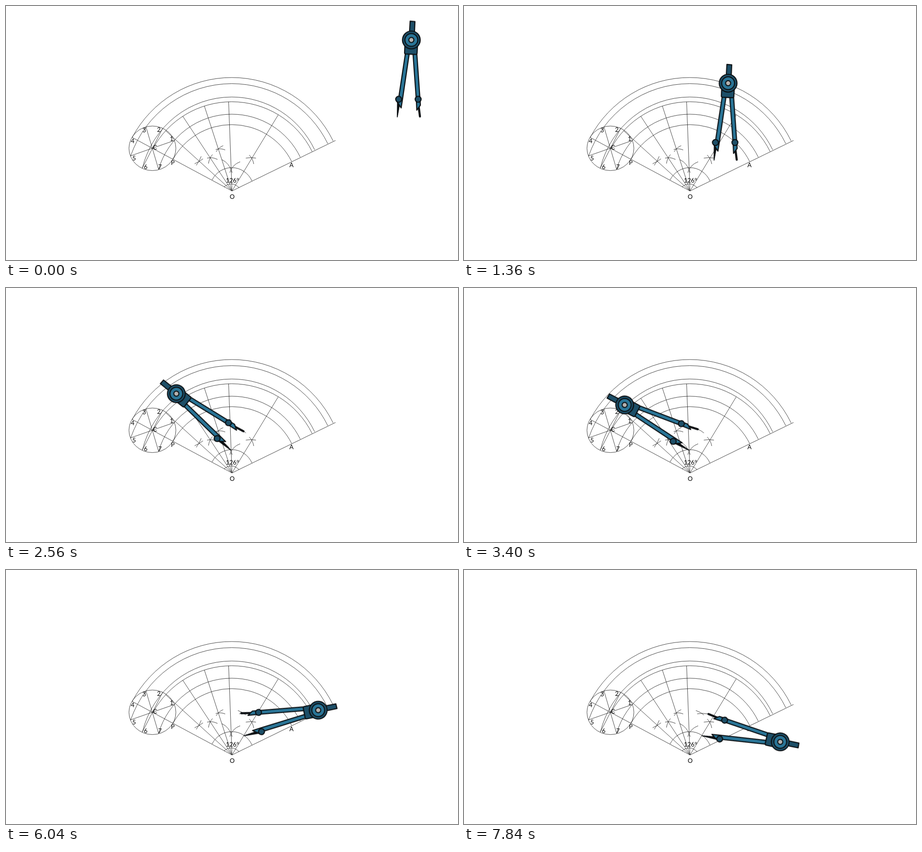
Animation of 998 by 561 pixels, one loop 7880 ms. Source, as an HTML page:

```html
<!DOCTYPE html>
<html lang="en">
<head>
<meta charset="utf-8">
<title>Bisecting the sector angle</title>
<style>
  html, body { margin: 0; width: 100%; height: 100%; overflow: hidden; background: #fff; }
  svg { display: block; width: 100vw; height: 100vh; }

  .lines { fill: none; stroke: #1c1c1c; stroke-width: .85; }
  .labels { font: 13.5px Lato, "Open Sans", sans-serif; fill: #000; text-anchor: middle; }

  .compass { stroke: #0b0f12; stroke-width: 2.3; stroke-linejoin: round; }
  .dark { fill: #1d4f68; }
  .blue { fill: #2a7597; }
  .metal { fill: #b4b2b0; }
  .ink { fill: #0b0f12; stroke-width: 1; }
  .lead { fill: none; stroke-width: 4.6; stroke-linecap: round; }

  .move, .spin, .trace { animation: 7.88s linear infinite; }
  .move { animation-name: move; }
  .spin { animation-name: spin; }
  .trace { stroke-dasharray: 1 2; }
  .first { animation-name: first; }
  .second { animation-name: second; }

  /* Position of the needle point */
  @keyframes move {
    0%, 1.2% { transform: translate(864px, 245.5px); animation-timing-function: cubic-bezier(.455, .03, .515, .955); }
    23.5% { transform: translate(496.5px, 358px); }
    51.52% { transform: translate(496.5px, 358px); animation-timing-function: cubic-bezier(.455, .03, .515, .955); }
    74.11%, 100% { transform: translate(525.5px, 366px); }
  }

  /* Turn about the needle point; mirrored for the second arc */
  @keyframes spin {
    0% { transform: rotate(0deg) scaleX(1); }
    23.6% { transform: rotate(0deg) scaleX(1); animation-timing-function: cubic-bezier(.455, .03, .515, .955); }
    31.73% { transform: rotate(-54.3deg) scaleX(1); }
    32.23% { transform: rotate(-54.3deg) scaleX(1); animation-timing-function: cubic-bezier(.455, .03, .515, .955); }
    51.52% { transform: rotate(-71.5deg) scaleX(1); }
    74.36% { transform: rotate(-71.5deg) scaleX(1); animation-timing-function: step-end; }
    74.37% { transform: rotate(79.7deg) scaleX(-1); }
    76.65% { transform: rotate(81.3deg) scaleX(-1); }
    81.22% { transform: rotate(85.3deg) scaleX(-1); }
    91.37% { transform: rotate(96.9deg) scaleX(-1); }
    99.49%, 100% { transform: rotate(104.8deg) scaleX(-1); }
  }

  @keyframes first {
    0% { stroke-dashoffset: 1.01; }
    29.73% { stroke-dashoffset: 1.01; animation-timing-function: ease-out; }
    31.73% { stroke-dashoffset: .72; }
    32.23% { stroke-dashoffset: .72; animation-timing-function: cubic-bezier(.455, .03, .515, .955); }
    51.52%, 100% { stroke-dashoffset: 0; }
  }

  @keyframes second {
    0%, 74.37% { stroke-dashoffset: 1.01; }
    76.65% { stroke-dashoffset: .89; }
    81.22% { stroke-dashoffset: .73; }
    91.37% { stroke-dashoffset: .3; }
    99.49%, 100% { stroke-dashoffset: 0; }
  }
</style>
</head>
<body>
<svg viewBox="0 0 998 561" preserveAspectRatio="none">
  <g class="lines">
    <!-- Generating circle and its spokes -->
    <ellipse cx="323.3" cy="314.3" rx="51.8" ry="49.2"/>
    <path d="M275 331 L372 297 M301 358 L346 270 M309 267 L337 361"/>

    <!-- Sector sides and bisectors -->
    <path d="M278 290 L499 408.5 L727.5 297"/>
    <path d="M499 408.5 L352 275 M499 408.5 L390 243 M499 408.5 L438 221 M499 408.5 L491.5 211.5 M499 408.5 L601 240.5"/>

    <!-- Arcs about O; dashes are in degrees clockwise from the right -->
    <g transform="translate(498.5 408)">
      <ellipse rx="249.2" ry="250" pathLength="360" stroke-dasharray="0 208 125.9 360"/>
      <ellipse rx="236" ry="236.5" pathLength="360" stroke-dasharray="0 199 134.9 360"/>
      <ellipse rx="203.4" ry="207" pathLength="360" stroke-dasharray="0 194.2 139.7 360"/>
      <ellipse rx="197.6" ry="196.5" pathLength="360" stroke-dasharray="0 208.2 125.7 360"/>
      <ellipse rx="168.3" ry="169" pathLength="360" stroke-dasharray="0 196.2 137.7 360"/>
      <ellipse rx="147.4" ry="146" pathLength="360" stroke-dasharray="0 207.9 126 360"/>
      <ellipse rx="49.2" ry="51" pathLength="360" stroke-dasharray="0 208 126.7 360"/>
    </g>
    <path d="M481 400 Q498 385 515 401.5"/>

    <!-- Bisection marks -->
    <path d="M416.5 348.5 Q426.5 344 435 337.5 M431 332 Q427 343 420 352"/>
    <path d="M444 336 Q456 333 467 339 M456 328 Q449 335 447 348"/>
    <path d="M463 317 Q474 313.5 484 318 M479.5 308.5 Q470 312 464 322"/>
    <path d="M477 339.5 Q493 347 499.5 368 M517 344 Q500 350 494 368"/>
    <path d="M529.5 336 Q541 333.5 552 336 M537 329 Q545 337 547 349"/>

    <path class="trace first" pathLength="1" d="M529.8 320.3 A50 50 0 0 0 512 310.3"/>
    <path class="trace second" pathLength="1" d="M514.9 317.8 A49.5 49.5 0 0 1 537.8 317.9"/>
  </g>

  <g class="labels">
    <text x="365.7" y="297.8">1</text>
    <text x="337.5" y="277.8">2</text>
    <text x="305.2" y="279">3</text>
    <text x="279.7" y="302.5">4</text>
    <text x="283" y="340.5">5</text>
    <text x="308.5" y="359.7">6</text>
    <text x="340" y="359.5">7</text>
    <text x="368.3" y="350.7">P</text>
    <text x="329" y="316.5">C</text>
    <text x="630.3" y="356">A</text>
    <text x="499.3" y="425.7">O</text>
    <text x="500" y="390">126°</text>
  </g>

  <g class="move"><g class="spin">
    <g class="compass" transform="translate(-864 -245.5)">
      <path class="ink" d="M864 212 L869 219 L864.3 245.5 L863.5 245.5 Z"/>
      <path class="lead" d="M911 221 L914 244"/>
      <path class="blue" d="M882 104 L890.5 104 L875.5 206 L872.5 225 L862 209 L867 203 Z"/>
      <path class="blue" d="M898.5 104 L907 104 L914 204 L915 219 L907 230 L906 208 Z"/>
      <circle class="dark" cx="867" cy="206" r="6.6"/>
      <circle class="dark" cx="910" cy="206" r="6.6"/>
      <path class="dark" d="M892.3 33.5 L903 34.3 L901.8 60 L890.8 59.5 Z"/>
      <path class="dark" d="M880.8 85 L908.7 86.5 L907.7 104 Q907.5 107 904.5 107 L882.5 106 Q879.8 105.5 880 103 Z"/>
      <circle class="dark" cx="895" cy="75" r="19.6"/>
      <circle class="blue" cx="895" cy="75" r="14.2"/>
      <circle class="metal" cx="895" cy="75" r="5.6"/>
    </g>
  </g></g>
</svg>
</body>
</html>
```
